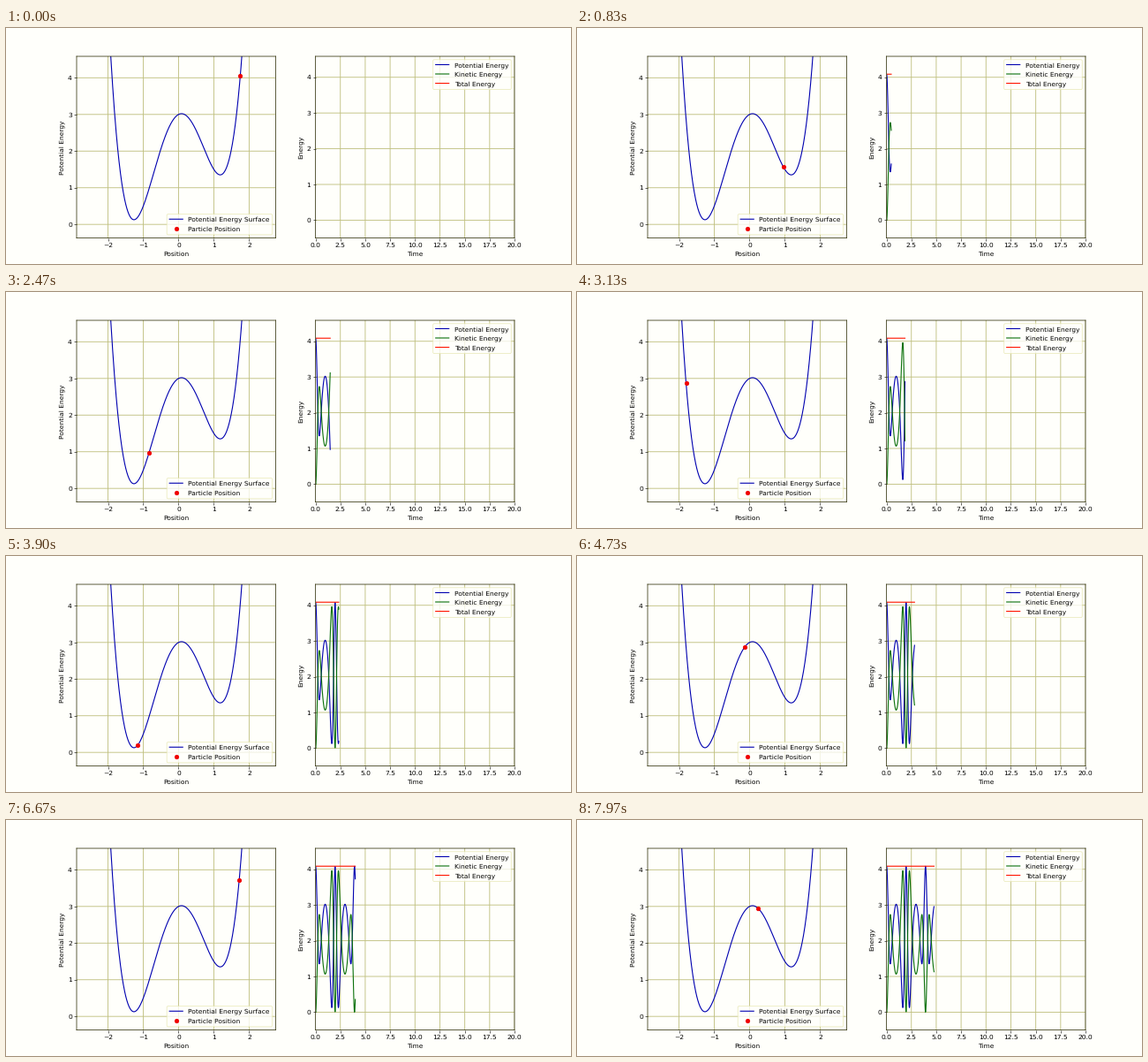
Write a matplotlib script that moves like this. It is 640 px wide and 267 px high and loops after 8 s.

```python
import numpy as np
import matplotlib.pyplot as plt
from matplotlib.animation import FuncAnimation

FRAMES, LOOP_MS = 240, 8000
DT, SUBSTEPS = 0.02, 20
X0, V0 = 1.75, 0.2
DPI = 160 / 3
PAPER, GRID, LEGEND_EDGE = "#fffffb", "#c0c080", "#e4e4a8"
FRAME = "#282800"
BLUE, GREEN, RED = "#0000b0", "#0a700a", "#ff1400"


def potential(x):
    return x**4 - 3 * x**2 + 0.5 * x + 3


def force(x):
    return -(4 * x**3 - 6 * x + 0.5)


def simulate():
    """Velocity Verlet for a unit mass."""
    h = DT / SUBSTEPS
    x, v = X0, V0
    xs, vs = [x], [v]
    for _ in range(FRAMES - 1):
        for _ in range(SUBSTEPS):
            v += force(x) * h / 2
            x += v * h
            v += force(x) * h / 2
        xs.append(x)
        vs.append(v)
    return np.array(xs), np.array(vs)


def style(ax, xlabel, ylabel, legend_loc):
    ax.set_facecolor(PAPER)
    ax.set_xlabel(xlabel)
    ax.set_ylabel(ylabel)
    ax.set_yticks(range(5))
    ax.grid(True, color=GRID, linewidth=1.2)
    ax.legend(loc=legend_loc, facecolor=PAPER, edgecolor=LEGEND_EDGE)


pos, vel = simulate()
time = np.arange(FRAMES) * DT
pot = potential(pos)
kin = vel**2 / 2
total = pot + kin

# Unhinted text and unsnapped lines keep true sub-pixel sizes at this low dpi.
plt.rcParams.update({
    "font.family": "DejaVu Sans", "font.size": 10.15,
    "text.hinting": "none", "path.snap": False,
    "axes.edgecolor": FRAME, "axes.linewidth": 1.0,
})
fig, (well, chart) = plt.subplots(
    1, 2, figsize=(640.01 / DPI, 267.01 / DPI), dpi=DPI, facecolor=PAPER)

grid_x = np.linspace(-3, 3, 600)
well.plot(grid_x, potential(grid_x), color=BLUE, label="Potential Energy Surface")
particle, = well.plot([], [], "o", color="#f00000", label="Particle Position")
style(well, "Position", "Potential Energy", "lower right")
well.set_xticks(range(-2, 3))
well.set_xlim(pos.min() - 1, pos.max() + 1)
well.set_ylim(pot.min() - 0.5, pot.max() + 0.5)

series = [(pot, BLUE, "Potential Energy"),
          (kin, GREEN, "Kinetic Energy"),
          (total, RED, "Total Energy")]
lines = [chart.plot([], [], color=c, label=name)[0] for _, c, name in series]
style(chart, "Time", "Energy", "upper right")
chart.set_xticks(np.arange(0, 20.1, 2.5))
chart.set_xlim(0, 20)
chart.set_ylim(-0.5, total.max() + 0.5)


def update(i):
    particle.set_data([pos[i]], [pot[i]])
    for line, (values, _, _) in zip(lines, series):
        line.set_data(time[:i + 1], values[:i + 1])
    return [particle, *lines]


anim = FuncAnimation(fig, update, frames=FRAMES, init_func=lambda: update(0),
                     interval=LOOP_MS / FRAMES, repeat=True, repeat_delay=0)
plt.show()
```
